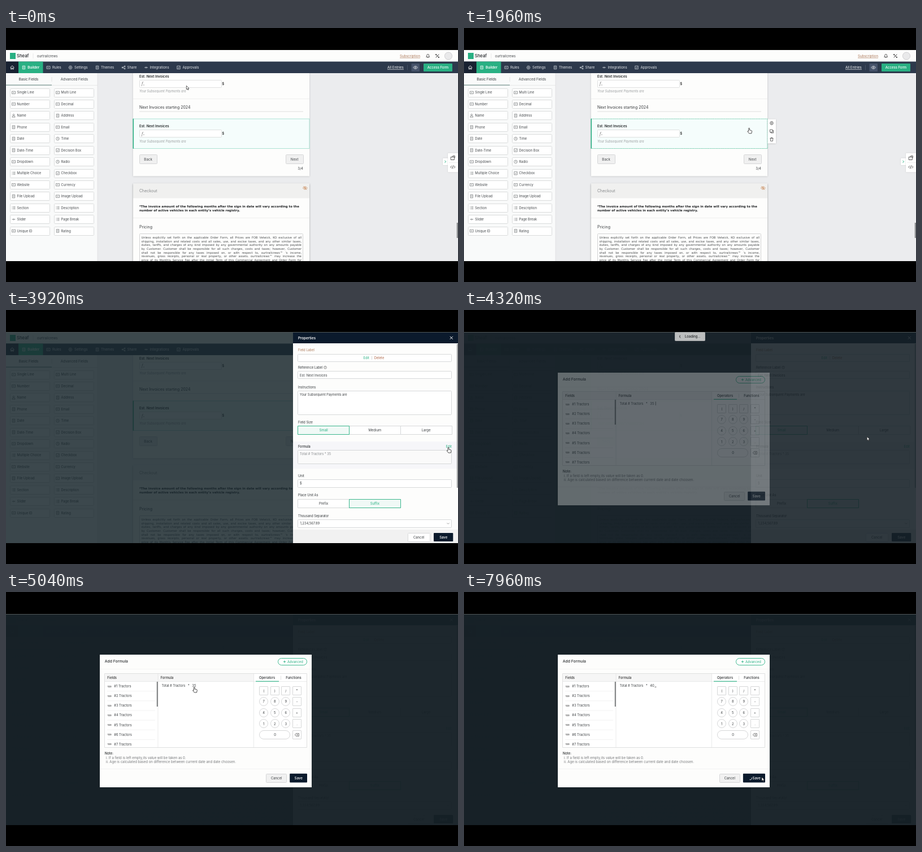
Write an HTML page with a canvas that moves like this. It is 800x450 px and loops after 8 s.

```html
<!DOCTYPE html>
<html lang="en">
<head>
<meta charset="utf-8">
<title>Editing a formula in a form builder</title>
<style>
html, body { margin: 0; width: 100%; height: 100%; overflow: hidden; background: #000; }
canvas { display: block; width: 800px; height: 450px; }
</style>
</head>
<body>
<canvas id="stage"></canvas>
<script>
const LOOP = 8000;
const SANS = 'Inter, sans-serif';
const WIDE = '"DejaVu Sans", sans-serif';
const INK = '#3d4043', GREEN = '#29b083', NAVY = '#0b1a2c', BROWN = '#ab7757', RULE = '#dcdddd', PAPER = '#fdfdfc';

const dpr = window.devicePixelRatio || 1;

function setUp(canvas) {
  canvas.width = 800 * dpr;
  canvas.height = 450 * dpr;
  const c = canvas.getContext('2d');
  c.scale(dpr, dpr);
  return c;
}

let ctx = setUp(document.getElementById('stage'));
const layer = setUp(document.createElement('canvas'));

// ---------- helpers ----------
const clamp = (v) => Math.min(1, Math.max(0, v));
const span = (t, a, b) => clamp((t - a) / (b - a));
const mix = (a, b, k) => a + (b - a) * k;
const ease = {
  in: (u) => u * u,
  out: (u) => 1 - (1 - u) * (1 - u),
  both: (u) => 0.5 - 0.5 * Math.cos(Math.PI * u)
};

function rect(x, y, w, h, fill) {
  ctx.fillStyle = fill;
  ctx.fillRect(x, y, w, h);
}

// outlined boxes sit on whole pixels so that their lines stay sharp
function box(x, y, w, h, fill, line, r = 1) {
  ctx.beginPath();
  if (line) ctx.roundRect(Math.floor(x) + 0.5, Math.floor(y) + 0.5, Math.round(w), Math.round(h), r);
  else ctx.roundRect(x, y, w, h, r);
  if (fill) { ctx.fillStyle = fill; ctx.fill(); }
  if (line) { ctx.strokeStyle = line; ctx.lineWidth = 0.9; ctx.stroke(); }
}

// y is the middle of the capitals
function text(s, x, y, size, color = INK, weight = 400, align = 'left', font = SANS) {
  ctx.font = `${weight} ${size}px ${font}`;
  ctx.textAlign = align;
  ctx.fillStyle = color;
  ctx.fillText(s, x, y + size * 0.36);
}

function justify(line, x, y, width, size) {
  const words = line.split(' ');
  ctx.font = `400 ${size}px ${WIDE}`;
  const sizes = words.map((w) => ctx.measureText(w).width);
  const gap = (width - sizes.reduce((a, b) => a + b)) / (words.length - 1);
  words.forEach((w, i) => {
    text(w, x, y, size, '#45484a', 400, 'left', WIDE);
    x += sizes[i] + gap;
  });
}

function icon(d, x, y, line, width = 0.8, fill) {
  const p = new Path2D(d);
  ctx.save();
  ctx.translate(x, y);
  if (fill) { ctx.fillStyle = fill; ctx.fill(p); }
  if (line) { ctx.strokeStyle = line; ctx.lineWidth = width; ctx.stroke(p); }
  ctx.restore();
}

function arc(x, y, r, from, sweep, color, width = 0.9) {
  ctx.beginPath();
  ctx.arc(x, y, r, from, from + sweep);
  ctx.strokeStyle = color;
  ctx.lineWidth = width;
  ctx.stroke();
}

function shadow(color, blur, draw) {
  ctx.save();
  ctx.shadowColor = color;
  ctx.shadowBlur = blur * dpr;
  draw();
  ctx.restore();
}

// draws a group as one picture, then blends it in
function fade(alpha, draw) {
  const main = ctx;
  ctx = layer;
  ctx.clearRect(0, 0, 800, 450);
  draw();
  ctx = main;
  ctx.globalAlpha = alpha;
  ctx.drawImage(layer.canvas, 0, 0, 800, 450);
  ctx.globalAlpha = 1;
}

const ICONS = {
  box: 'M-3-2.2h6v4.4h-6zM-1.5 0h2.6',
  page: 'M-2.2-2.8h4.4v5.6h-4.4zM-1-1h2M-1 .8h2',
  ring: 'M2.8 0a2.8 2.8 0 1 1-5.6 0a2.8 2.8 0 1 1 5.6 0M0-1.6v1.8h1.2',
  head: 'M1.4-1.4a1.4 1.4 0 1 1-2.8 0a1.4 1.4 0 1 1 2.8 0M-2.6 2.8q0-2.6 2.6-2.6t2.6 2.6z',
  list: 'M-3-2h1M-1-2h4M-3 0h1M-1 0h4M-3 2h1M-1 2h4',
  tick: 'M-2.7-2.7h5.4v5.4h-5.4zM-1.4 0l1.1 1.2l1.9-2.3',
  slide: 'M-3 0h2M1 0h2M-1 0a1 1 0 1 0 2 0a1 1 0 1 0-2 0',
  home: 'M-3.5 0l3.5-3.2l3.5 3.2M-2.3-.6v3.6h1.5v-2h1.6v2h1.5v-3.6',
  share: 'M2-2l-4 2l4 2M1.2-2a1 1 0 1 0 2 0a1 1 0 1 0-2 0M-3 0a1 1 0 1 0 2 0a1 1 0 1 0-2 0M1.2 2a1 1 0 1 0 2 0a1 1 0 1 0-2 0',
  gear: 'M3 0l-1.5 2.7h-3l-1.5-2.7l1.5-2.7h3zM1.1 0a1.1 1.1 0 1 1-2.2 0a1.1 1.1 0 1 1 2.2 0',
  eye: 'M-4 0q4-5 8 0q-4 5-8 0zM1.2 0a1.2 1.2 0 1 1-2.4 0a1.2 1.2 0 1 1 2.4 0',
  bell: 'M-3 1.8q1.2-1 1.2-3q0-1.8 1.8-1.8t1.8 1.8q0 2 1.2 3zM-.8 3h1.6',
  tools: 'M-2.8 2.8l5.6-5.6M-2.8-2.8l5.6 5.6M-2.8-1.3v-1.5h1.5M1.4 2.8h1.4v-1.4',
  copy: 'M-3-3h4.5v4.5h-4.5zM-1.5 1.5v1.5h4.5v-4.5h-1.5',
  bin: 'M-3-2h6M-1-2v-1h2v1M-2.3-2l.4 5h3.8l.4-5',
  code: 'M-1.8-2.2l-2.2 2.2l2.2 2.2M1.8-2.2l2.2 2.2l-2.2 2.2M.7-2.8l-1.4 5.6',
  erase: 'M-3.6 0l2-2.4h5v4.8h-5zM-.4-1l2 2M1.6-1l-2 2',
  cross: 'M-2.5-2.5l5 5M2.5-2.5l-5 5'
};

// ---------- builder page ----------
const FIELDS = [
  'Single Line:box', 'Multi Line:box', 'Number:box', 'Decimal:box', 'Name:head', 'Address:page',
  'Phone:page', 'Email:box', 'Date:page', 'Time:ring', 'Date-Time:page', 'Decision Box:tick',
  'Dropdown:box', 'Radio:ring', 'Multiple Choice:list', 'Checkbox:tick', 'Website:box', 'Currency:box',
  'File Upload:page', 'Image Upload:box', 'Section:list', 'Description:list', 'Slider:slide',
  'Page Break:list', 'Unique ID:box', 'Rating:page'
].map((f) => f.split(':'));

const TABS = [['Rules', 75, 82, 'box'], ['Settings', 114, 121, 'gear'], ['Themes', 161.5, 168, 'page'],
  ['Share', 208, 214.5, 'share'], ['Integrations', 248, 254.5, 'slide'], ['Approvals', 305.5, 312.5, 'tick']];

const TERMS = [
  'Unless explicitly set forth on the applicable Order Form, all Prices are FOB Velwick, KO exclusive of all',
  'shipping, installation and related costs and all sales, use, and excise taxes, and any other similar taxes,',
  'duties, tariffs, and charges of any kind imposed by any governmental authority on any amounts payable',
  'by Customer. Customer shall be responsible for all such charges, costs and taxes; however, Customer',
  'shall not be responsible for any taxes imposed on, or with respect to, ourtrailcrews™ ’s income,',
  'revenues, gross receipts, personal or real property, or other assets. ourtrailcrews™ may increase the',
  'price of its Monthly Service Fee after the Initial Term of this Commercial Agreement and Order Form for'
];

function drawHeader() {
  rect(0, 39, 800, 20.5, PAPER);
  rect(7, 44, 10, 11, GREEN);
  text('Sheaf', 19, 49.5, 7.7, '#222529', 500);
  rect(47.7, 45, 0.6, 9, '#ddd');
  text('ourtrailcrews', 55, 49.5, 5.9, '#45484b');
  text('Subscription', 697, 49.5, 6.05, BROWN);
  rect(697, 52.8, 36, 0.6, BROWN);
  icon(ICONS.bell, 746.7, 49.5, '#333');
  icon(ICONS.tools, 763.5, 49.5, '#333', 1);
  ctx.beginPath();
  ctx.arc(783, 49.5, 6.8, 0, 7);
  ctx.fillStyle = '#e9e9ea';
  ctx.fill();
  arc(783, 49.5, 6.6, 0, 7, '#c4c5c7', 0.7);

  rect(0, 59.5, 800, 20.5, '#2d394c');
  rect(0, 59.5, 22, 20.5, '#182131');
  icon(ICONS.home, 11, 70, '#fff');
  rect(22, 59.5, 43.5, 20.5, GREEN);
  icon(ICONS.page, 31.5, 70, '#fff');
  text('Builder', 38.3, 70, 6.1, '#fff', 600);
  for (const [name, ix, tx, key] of TABS) {
    icon(ICONS[key], ix, 70, '#dfe3e8', 0.7);
    text(name, tx, 70, 6.1, '#e8ebef');
  }
  text('All Entries', 675, 69.8, 6.1, '#fff');
  rect(675, 73.2, 29, 0.6, '#fff');
  rect(710.2, 65.5, 0.6, 9, '#566274');
  box(717.5, 63, 14.5, 14, '#46536a');
  icon(ICONS.eye, 724.7, 70, '#fff', 0.7);
  box(739, 63, 51, 14, GREEN);
  text('Access Form', 764.5, 70, 6, '#fff', 500, 'center');
}

function drawSidebar() {
  rect(0, 80, 162, 333, '#f9fafa');
  rect(161.7, 80, 0.7, 333, '#d9dbdd');
  text('Basic Fields', 40, 91, 6.15, '#2f3336', 400, 'center');
  text('Advanced Fields', 121, 91, 6.15, '#3f4346', 400, 'center');
  rect(80.7, 87, 0.6, 8, '#d5d7d8');
  rect(0, 101, 162, 0.6, RULE);
  rect(0, 100.6, 81, 1, '#5c7f79');
  FIELDS.forEach(([name, key], i) => {
    const x = i % 2 ? 85 : 7;
    const y = 114.4 + 20.42 * (i >> 1);
    box(x, y - 7.3, 70, 14.6, '#fff', '#d6d8d9');
    icon(ICONS[key], x + 6.5, y, '#55595c', 0.6);
    text(name, x + 12.6, y, 5.8, '#45494c');
  });
}

function drawFormulaField(y) {
  text('Est. Next Invoices', 236, y, 6.1, '#25282a', 600);
  box(236, y + 6.6, 144.6, 13, '#fff', RULE);
  text('f', 240, y + 12.8, 7, '#777', 'italic 400', 'left', '"Noto Serif", serif');
  text('x', 242.8, y + 14.6, 4, '#777', 'italic 400', 'left', '"Noto Serif", serif');
  text('$', 382.3, y + 13, 6, '#333', 600);
  text('Your Subsequent Payments are', 236, y + 26.5, 5.55, '#999c9e', 'italic 400');
}

function drawForm(hover) {
  shadow('rgba(0,0,0,.18)', 3, () => rect(225, 70, 312, 192.5, PAPER));
  drawFormulaField(85.7);
  rect(225, 125, 312, 0.6, '#e6e6e6');
  text('Next Invoices starting 2024', 236, 140, 6.95, '#34373a');
  rect(236, 147.7, 290, 0.6, '#c9cacb');

  rect(225, 161, 312, 52.5, '#f5fdfc');
  ctx.save();
  if (hover) ctx.setLineDash([1.6, 1.1]);
  ctx.strokeStyle = hover ? GREEN : '#9adcca';
  ctx.lineWidth = 0.8;
  ctx.strokeRect(225.4, 161, 311.6, 52.5);
  ctx.restore();
  rect(224.5, 160.7, 1.6, 53, GREEN);
  drawFormulaField(174.2);

  for (const [name, x] of [['Back', 236], ['Next', 495]]) {
    box(x, 224.6, 30.8, 15.8, '#f0f0f0', '#d2d3d4');
    text(name, x + 15.6, 233, 6.2, '#45484b', 400, 'center');
  }
  text('3/4', 526, 248.5, 6, INK, 400, 'right');

  shadow('rgba(0,0,0,.35)', 3, () => rect(225, 275.5, 312, 150, PAPER));
  rect(225, 275.5, 312, 26, '#f0f0ef');
  text('Checkout', 236, 288.5, 7, '#85888a');
  icon(ICONS.eye, 529.3, 283.5, '#c98a5a');
  icon('M-3-3l6 6', 529.3, 283.5, '#c98a5a');
  text('*The invoice amount of the following months after the sign in date will vary according to the', 236, 316, 5.4, '#1f2123', 700, 'left', WIDE);
  text('number of active vehicles in each entity’s vehicle registry.', 236, 323, 5.4, '#1f2123', 700, 'left', WIDE);
  rect(225, 336, 312, 0.6, '#e6e6e6');
  text('Pricing', 236, 352, 7);
  box(236, 364, 289.4, 60, PAPER, '#cfd0d1');
  TERMS.forEach((line, i) => justify(line, 239.5, 371.2 + 6.67 * i, 283.5, 5.1));

  if (hover) {
    shadow('rgba(0,0,0,.3)', 3, () => rect(537.5, 161.5, 14.5, 43, '#fff'));
    icon(ICONS.gear, 544.5, 168.5, '#333', 0.7);
    icon(ICONS.copy, 544.5, 183, '#333', 0.7);
    icon(ICONS.bin, 544.5, 197.3, '#333', 0.7);
  }
}

function drawPage(hover) {
  rect(0, 39, 800, 374, '#ebecee');
  drawForm(hover);
  drawSidebar();
  drawHeader();
  shadow('rgba(0,0,0,.2)', 2, () => {
    box(773, 230.5, 12, 12.5, '#fff');
    box(782, 221.5, 20, 34, '#fff');
  });
  icon('M-1-2l2 2l-2 2', 777.5, 236.8, GREEN, 1);
  icon('M-3.5-1.5h6v5h-6zM0-1.5v-2h3.5v3.5', 790.8, 230, '#333');
  rect(784, 238.4, 16, 0.5, '#ddd');
  icon(ICONS.code, 790.8, 246.3, '#333');
  rect(797.7, 345, 2.3, 27, '#8d9092');
}

// ---------- properties panel ----------
function segments(y, names, chosen) {
  const cell = (i, fill, line, color) => {
    const x = 516.6 + 90.7 * i;
    box(x, y, 90.7, 14.6, fill, line, 0);
    text(names[i], x + 45.5, y + 7.8, 6, color, 400, 'center');
  };
  names.forEach((name, i) => cell(i, '#fff', '#d3d5d6', INK));
  cell(chosen, '#f0f9f6', GREEN, GREEN);
}

function drawPanel(left, focused) {
  ctx.save();
  ctx.translate(left - 508, 0);
  rect(508, 39, 292, 374, PAPER);
  rect(508, 40, 292, 19, NAVY);
  text('Properties', 517, 49.5, 6.2, '#fff', 600);
  icon(ICONS.cross, 788.3, 49.3, '#fff', 1);

  const line = '#d3d5d6';
  const label = (s, y, color = '#33373a', weight = 400) => text(s, 517, y, 5.65, color, weight);
  const input = (y, h, fill = '#fff', stroke = line) => box(516.6, y, 272.4, h, fill, stroke);

  label('Field Label', 71.2, BROWN);
  input(78, 13.4);
  text('Edit', 632.5, 84.8, 5.8, GREEN);
  rect(647.3, 81.5, 0.6, 6.5, '#bbb');
  text('Delete', 651.7, 84.8, 5.8, '#b06a4b');
  label('Reference Label', 102);
  arc(565, 101.8, 2.4, 0, 7, '#555', 0.6);
  text('i', 565, 101.8, 4, '#555', 500, 'center');
  input(108.7, 13.4, '#fff', focused ? GREEN : line);
  if (focused) rect(519.5, 112, 48.8, 7, '#bfe3db');
  text('Est. Next Invoices', 520, 115.6, 5.75);
  label('Instructions', 136.5);
  input(143, 41.5);
  text('Your Subsequent Payments are', 520, 150.4, 5.65);
  label('Field Size', 198.6);
  segments(205.3, ['Small', 'Medium', 'Large'], 0);

  rect(508, 233.3, 292, 48, '#f6f6f9');
  label('Formula', 242.3, '#2c2f32', 500);
  text('Edit', 789, 242.3, 5.9, GREEN, 400, 'right');
  input(248.5, 24.3, '#fafafa');
  text('Total # Tractors * 35', 520, 254.8, 5.7, '#85888b');
  label('Unit', 293.6);
  input(300.3, 13.6);
  text('$', 520, 307, 5.8);
  label('Place Unit As', 328.2);
  segments(335, ['Prefix', 'Suffix'], 1);
  label('Thousand Separator', 364.6);
  input(371.4, 13.6);
  text('1,234,567.89', 520.5, 378.4, 5.8);
  icon('M-2-1l2 2l2-2', 782.5, 378.2, '#777', 0.7);

  rect(508, 389, 292, 24, '#f1f1f1');
  box(711, 395, 39, 14.6, '#fff', '#d4d5d6');
  text('Cancel', 730.6, 402.6, 5.9, INK, 400, 'center');
  box(757, 395, 34.3, 15, NAVY);
  text('Save', 774.2, 402.6, 6, '#fff', 500, 'center');
  rect(797.8, 60, 2.2, 255, '#a3a5a6');
  ctx.restore();
}

// ---------- formula dialog ----------
const KEYS = ['()/*', '789-', '456+', '123.'];

function drawDialog(t, value, saving) {
  rect(166, 111, 375, 235, PAPER);
  text('Add Formula', 174.7, 122.7, 6.8, '#2d3032', 500);
  box(481, 117, 51.4, 12.2, '#fff', GREEN, 6.1);
  icon('M-2.1 0h4.2M0-2.1v4.2', 493, 123.5, GREEN, 0.9);
  text('Advanced', 498, 123.5, 5.8, GREEN);
  rect(166, 136, 375, 0.5, '#ececec');

  box(174.6, 144.4, 357.6, 131, '#fff', RULE, 0);
  rect(175.3, 145, 263, 13.5, '#f6f6f6');
  rect(175, 158.3, 357.6, 0.6, RULE);
  rect(268.7, 144.6, 0.6, 131, RULE);
  rect(438.3, 144.6, 0.6, 131, RULE);
  text('Fields', 179.3, 151.8, 5.9, '#333', 500);
  text('Formula', 273.5, 151.8, 5.9, '#333', 500);
  text('Operators', 462, 151.8, 5.9, '#2c2f31', 500, 'center');
  text('Functions', 509, 151.8, 5.9, '#2c2f31', 500, 'center');
  rect(486, 148.5, 0.6, 7, '#ccc');
  rect(442, 157.7, 41, 1.1, GREEN);

  for (let i = 0; i < 7; i++) {
    const y = 167.2 + 17.07 * i;
    text('123', 179.8, y, 4, '#333', 600);
    text(`#${i + 1} Tractors`, 191.3, y, 5.75);
    if (i < 6) rect(179, y + 8.4, 85, 0.5, '#e4e4e4');
  }
  rect(266.8, 159, 2, 44, '#7b7d7e');

  text('Total # Tractors', 275.5, 165.8, 5.65);
  text('*', 321.7, 166, 5.8);
  text(value, 329.3, 165.8, 5.8);
  if (t < 4440) rect(338.8, 162.3, 0.7, 6.6, '#333');
  if (t >= 6520 && Math.floor((t - 6520) / 520) % 2 === 0) rect(337.4, 167.8, 3, 0.8, '#444');

  KEYS.forEach((row, r) => [...row].forEach((key, c) => {
    const x = 456.2 + 19.6 * c, y = 174.8 + 19.55 * r;
    box(x - 7.5, y - 7.5, 15, 15, '#fff', '#d2d3d4', r && c < 3 ? 7.5 : 0.5);
    text(key, x, y, 5.8, INK, 400, 'center');
  }));
  box(448.7, 245.5, 54.3, 15, '#fff', '#d2d3d4', 7.5);
  text('0', 476, 253, 5.8, INK, 400, 'center');
  box(507.5, 245.5, 15, 15, '#fff', '#d2d3d4', 0.5);
  icon(ICONS.erase, 515, 253, '#444', 0.7);

  text('Note:', 174.7, 286, 6, '#2d3032', 500);
  text('i. If a field is left empty,its value will be taken as 0.', 177, 294, 6, '#77797b');
  text('ii. Age is calculated based on difference between current date and date choosen.', 177, 301.2, 6, '#77797b');
  rect(166, 313, 375, 0.5, '#e8e8e8');

  const shift = saving ? -8.3 : 0;
  box(460.6 + shift, 322, 35.6, 15, '#f1f1f1', '#d2d3d4');
  text('Cancel', 478.6 + shift, 329.6, 5.9, INK, 400, 'center');
  box(502.2 + shift, 321.8, 30.8 - shift, 15.6, NAVY);
  text('Save', 517.6, 329.6, 6.1, '#fff', 500, 'center');
  if (saving) arc(506.8, 330, 2.6, (t - 7960) / 110 - 0.5, 2.6, '#fff', 0.9);
}

function drawLoading(t) {
  box(373, 39, 53, 15, '#bcbebe', '#aeb1b1');
  arc(384.5, 47, 2.8, 2.1 + (t - 4320) / 110, 2, '#222', 1);
  text('Loading...', 391, 47, 5.8, '#26292b', 500);
}

// ---------- pointer ----------
const PATH = [
  [0, 319.3, 102.3], [400, 319.3, 102.3], [1600, 504.6, 176.8, 'both'], [2120, 504.6, 176.8],
  [2520, 403.3, 182.6, 'both'], [3000, 403.3, 182.6], [3720, 783, 243, 'both'], [4200, 783, 243],
  [4320, 715, 224.8, 'in'], [4760, 333.3, 168, 'out'], [5520, 333.3, 168],
  [5920, 343, 173, 'both'], [6500, 343, 173], [6560, 345, 176, 'both'], [6720, 345, 176],
  [7280, 535, 330, 'both'], [7520, 527, 328, 'both'], [LOOP, 527, 328]
];
const HAND_TIMES = [[1380, 2640], [3640, 4240], [4740, 6860], [7200, 7600]];

function drawPointer(t) {
  const i = PATH.findIndex((p) => p[0] > t);
  const a = PATH[i - 1], b = PATH[i];
  const k = ease[b[3] || 'both'](span(t, a[0], b[0]));
  const x = mix(a[1], b[1], k), y = mix(a[2], b[2], k);
  if (HAND_TIMES.some(([from, to]) => t >= from && t < to)) {
    icon('M-.9 1q.9-1.8 1.8 0v3l3.2.8q1 .3.9 1.5l-.8 3.7h-4.2l-2.7-3.4q-.2-1.4 1.8-.4z', x, y, '#222', 0.8, '#fff');
  } else {
    icon('M0 0v6.6l1.6-1.4l1 2.3l1.1-.5l-1-2.2h2.1z', x, y, '#222', 0.7, '#fff');
  }
}

// ---------- timeline ----------
const EDITS = [[6320, '40'], [6240, '4'], [6160, ''], [6080, '3'], [0, '35']];

function draw(t) {
  rect(0, 0, 800, 450, '#000');
  ctx.save();
  ctx.beginPath();
  ctx.rect(0, 39, 800, 374);
  ctx.clip();

  drawPage(t >= 1380 && t < 2560);
  const dim = span(t, 2540, 2700);
  if (dim) {
    rect(0, 39, 800, 374, `rgba(23,37,43,${0.84 * dim})`);
    const left = Math.round(mix(800, 508, ease.out(span(t, 2540, 2980))));
    drawPanel(left, t < 3500);
  }
  const dark = ease.out(span(t, 4180, 4380));
  if (dark) rect(0, 39, 800, 374, `rgba(22,32,39,${0.97 * dark})`);
  if (dim) rect(0, 39, 800, 1, `rgba(80,88,90,${dim})`);

  const show = span(t, 4240, 4490);
  if (show) fade(show, () => drawDialog(t, EDITS.find((e) => t >= e[0])[1], t >= 7600));
  if (t >= 4200 && t < 4420) drawLoading(t);
  drawPointer(t);
  ctx.restore();
}

const start = performance.now();
function tick() {
  draw((performance.now() - start) % LOOP);
  requestAnimationFrame(tick);
}
tick();
</script>
</body>
</html>
```
